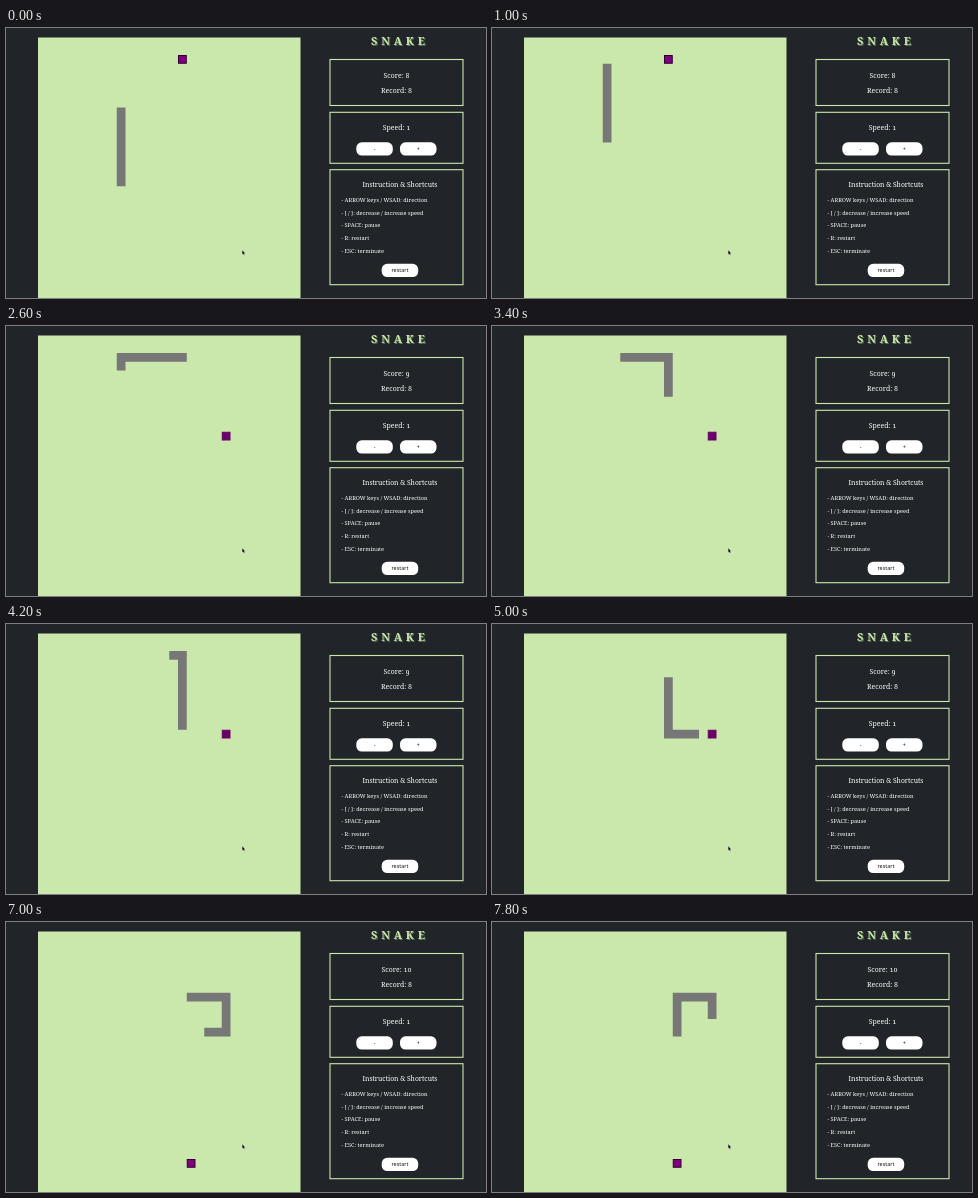
An HTML page that plays this animation: 480 by 270 pixels, repeating every 8 s.

```html
<!DOCTYPE html>
<html lang="en">
<head>
<meta charset="utf-8">
<title>Snake</title>
<style>
  html, body { margin: 0; width: 100%; height: 100%; overflow: hidden; background: #212529; }
  svg { display: block; width: 100%; height: 100%; }
  text { font-family: "Noto Serif", serif; font-variant-numeric: oldstyle-nums; fill: #fff; }
  .title { font-size: 11px; font-weight: 700; letter-spacing: 3.8px; fill: #cbe8ac; text-shadow: 1px 1px 0 #5f7a55; }
  .mid { text-anchor: middle; }
  .stat { font-size: 6.9px; }
  .head { font-size: 6.75px; }
  .item { font-size: 5.6px; }
  .label { font: 5.4px "Noto Sans", sans-serif; fill: #111; }
  .panel { fill: none; stroke: #cbe8ac; stroke-width: 1.1; }
  .button { fill: #fff; }
  #snake { fill: none; stroke: #777; stroke-width: 8.75; stroke-linecap: square; stroke-linejoin: miter; }
</style>
</head>
<body>
<svg viewBox="0 0 480 270">
  <rect width="480" height="270" fill="#212529"/>
  <rect x="32" y="9.5" width="262.5" height="262.5" fill="#cae8ab"/>
  <rect id="food"/>
  <polyline id="snake"/>
  <path d="M236.2 222v4.6l1-.9.7 1.6.8-.4-.7-1.5h1.3z" fill="#000" stroke="#fff" stroke-width=".25"/>

  <text class="title" x="365" y="17.3">SNAKE</text>

  <rect class="panel" x="324" y="31.5" width="133" height="46"/>
  <text class="mid stat" id="score" x="390.5" y="49.5"></text>
  <text class="mid stat" x="390.5" y="64.7">Record: 8</text>

  <rect class="panel" x="324" y="84.3" width="133" height="51"/>
  <text class="mid stat" x="390.5" y="102.2">Speed: 1</text>
  <g id="buttons"></g>

  <rect class="panel" x="324" y="141.7" width="133" height="115"/>
  <text class="mid head" x="394" y="159.3">Instruction &amp; Shortcuts</text>
  <g id="help"></g>
</svg>
<script>
const CELL = 8.75, LEFT = 32, TOP = 9.5;
const STEP_MS = 200, LOOP_MS = 8000, START_LENGTH = 9;
const MOVES = { U: [0, -1], D: [0, 1], L: [-1, 0], R: [1, 0] };

// Each meal starts when the snake reaches the previous one.
const meals = [
  { step: 0, score: 8, col: 16, row: 2, fill: "#800080", edge: "#2c0030" },
  { step: 13, score: 9, col: 21, row: 11, fill: "#680068", edge: "#680068" },
  { step: 27, score: 10, col: 17, row: 26, fill: "#800080", edge: "#2c0030" }
];

const $ = id => document.getElementById(id);

function add(parent, tag, attrs, text = "") {
  const node = document.createElementNS("http://www.w3.org/2000/svg", tag);
  setAttrs(node, attrs);
  node.textContent = text;
  parent.append(node);
}

function setAttrs(node, attrs) {
  for (const name in attrs) node.setAttribute(name, attrs[name]);
}

function addButton(x, y, text) {
  add($("buttons"), "rect", { class: "button", x, y, width: 36.5, height: 13.2, rx: 5.5 });
  add($("buttons"), "text", { class: "mid label", x: x + 18.25, y: y + 8.4 }, text);
}

addButton(350.3, 114.3, "-");
addButton(394, 114.3, "+");
addButton(375.7, 235.8, "restart");

[
  "- ARROW keys / WSAD: direction",
  "- [ / ]: decrease / increase speed",
  "- SPACE: pause",
  "- R: restart",
  "- ESC: terminate"
].forEach((line, i) => add($("help"), "text", { class: "item", x: 335.4, y: 174 + i * 12.72 }, line));

function buildTrail(start, turns) {
  const trail = [start];
  for (const [dir, count] of turns) {
    const [dx, dy] = MOVES[dir];
    for (let i = 0; i < count; i++) {
      const [col, row] = trail[trail.length - 1];
      trail.push([col + dx, row + dy]);
    }
  }
  return trail;
}

const trail = buildTrail([9, 16],
  [["U", 14], ["R", 7], ["D", 9], ["R", 5], ["U", 4], ["L", 4], ["D", 4]]);

const center = ([col, row]) => `${LEFT + (col + 0.5) * CELL},${TOP + (row + 0.5) * CELL}`;

function draw(step) {
  const eaten = meals.slice(1).filter(meal => step > meal.step).length;
  const end = START_LENGTH + step;
  const body = trail.slice(end - START_LENGTH - eaten, end);
  $("snake").setAttribute("points", body.map(center).join(" "));

  const meal = meals.filter(m => step >= m.step).pop();
  setAttrs($("food"), {
    x: LEFT + meal.col * CELL + 0.5, y: TOP + meal.row * CELL + 0.5,
    width: CELL - 1, height: CELL - 1, fill: meal.fill, stroke: meal.edge
  });
  $("score").textContent = `Score: ${meal.score}`;
}

const startTime = performance.now();
let shown = -1;

function tick() {
  const step = Math.floor((performance.now() - startTime) % LOOP_MS / STEP_MS);
  if (step !== shown) draw(shown = step);
  requestAnimationFrame(tick);
}
tick();
</script>
</body>
</html>
```
